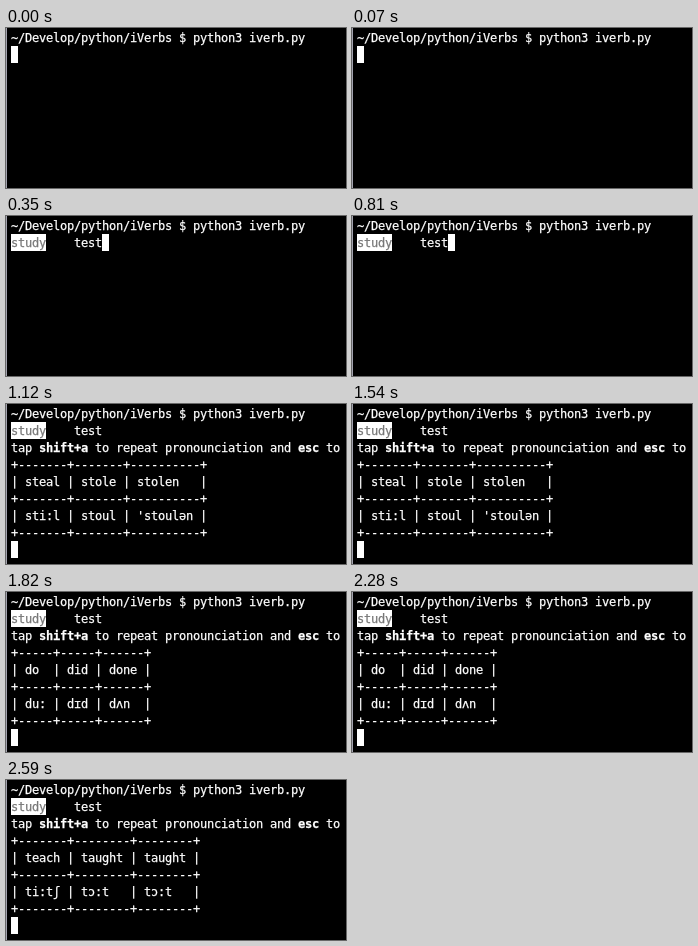
An HTML page for the animation above (3290 ms loop, 340x160 px).

```html
<!DOCTYPE html>
<html lang="en">
<head>
<meta charset="utf-8">
<title>Irregular verbs in a terminal</title>
<style>
  html, body { margin: 0; width: 100%; height: 100%; overflow: hidden; background: #000; }
  #stage { position: relative; width: 340px; height: 160px; overflow: hidden; background: #000; }
  #stage::before {
    content: ""; position: absolute; left: 0; top: 0; width: 1px; height: 100%;
    background: #a4a4b0;
  }
  pre {
    position: absolute; left: 5px; top: 2px; margin: 0; opacity: 0;
    font: 12px/17px "DejaVu Sans Mono", monospace;
    letter-spacing: calc(7px - 1ch); /* whole-pixel terminal cells */
    font-variant-ligatures: none;
    color: #fff;
    -webkit-text-stroke: 0.25px;
  }
  /* cell backgrounds sit one pixel above the text lines */
  mark, i { display: inline-block; height: 17px; margin-top: -1px; vertical-align: top; background: #fff; }
  mark { line-height: 19px; color: #777; }
  i { width: 7px; }
</style>
</head>
<body>
<div id="stage"></div>
<script>
const LOOP = 3290;
const CURSOR = '<i></i>';
const PROMPT = '~/Develop/python/iVerbs $ python3 iverb.py\n';
const MENU = PROMPT + '<mark>study</mark>    test';
const HINT = '\ntap <b>shift+a</b> to repeat pronounciation and <b>esc</b> to\n';

function table(rows) {
  const widths = rows[0].map((_, c) => Math.max(...rows.map(row => row[c].length)));
  const rule = '+' + widths.map(w => '-'.repeat(w + 2) + '+').join('') + '\n';
  const line = row => '|' + row.map((cell, c) => ` ${cell.padEnd(widths[c])} |`).join('') + '\n';
  return rule + rows.map(row => line(row) + rule).join('');
}

const lesson = (...rows) => MENU + HINT + table(rows) + CURSOR;

const screens = [
  [0, PROMPT + CURSOR],
  [350, MENU + CURSOR],
  [1120, lesson(['steal', 'stole', 'stolen'], ['sti:l', 'stoul', "'stoulən"])],
  [1820, lesson(['do', 'did', 'done'], ['du:', 'dɪd', 'dʌn'])],
  [2590, lesson(['teach', 'taught', 'taught'], ['ti:tʃ', 'tɔ:t', 'tɔ:t'])]
];

const stage = document.getElementById('stage');

screens.forEach(([start, html], n) => {
  const end = n + 1 < screens.length ? screens[n + 1][0] : LOOP;
  const pre = document.createElement('pre');
  pre.innerHTML = html;
  stage.append(pre);

  const steps = [{ offset: start / LOOP, opacity: 1 }];
  if (start > 0) steps.unshift({ offset: 0, opacity: 0 });
  if (end < LOOP) steps.push({ offset: end / LOOP, opacity: 0 });
  steps.push({ offset: 1, opacity: end < LOOP ? 0 : 1 });

  const animation = pre.animate(
    steps.map(step => ({ ...step, easing: 'step-end' })),
    { duration: LOOP, iterations: Infinity }
  );
  animation.startTime = document.timeline.currentTime;
});
</script>
</body>
</html>
```
